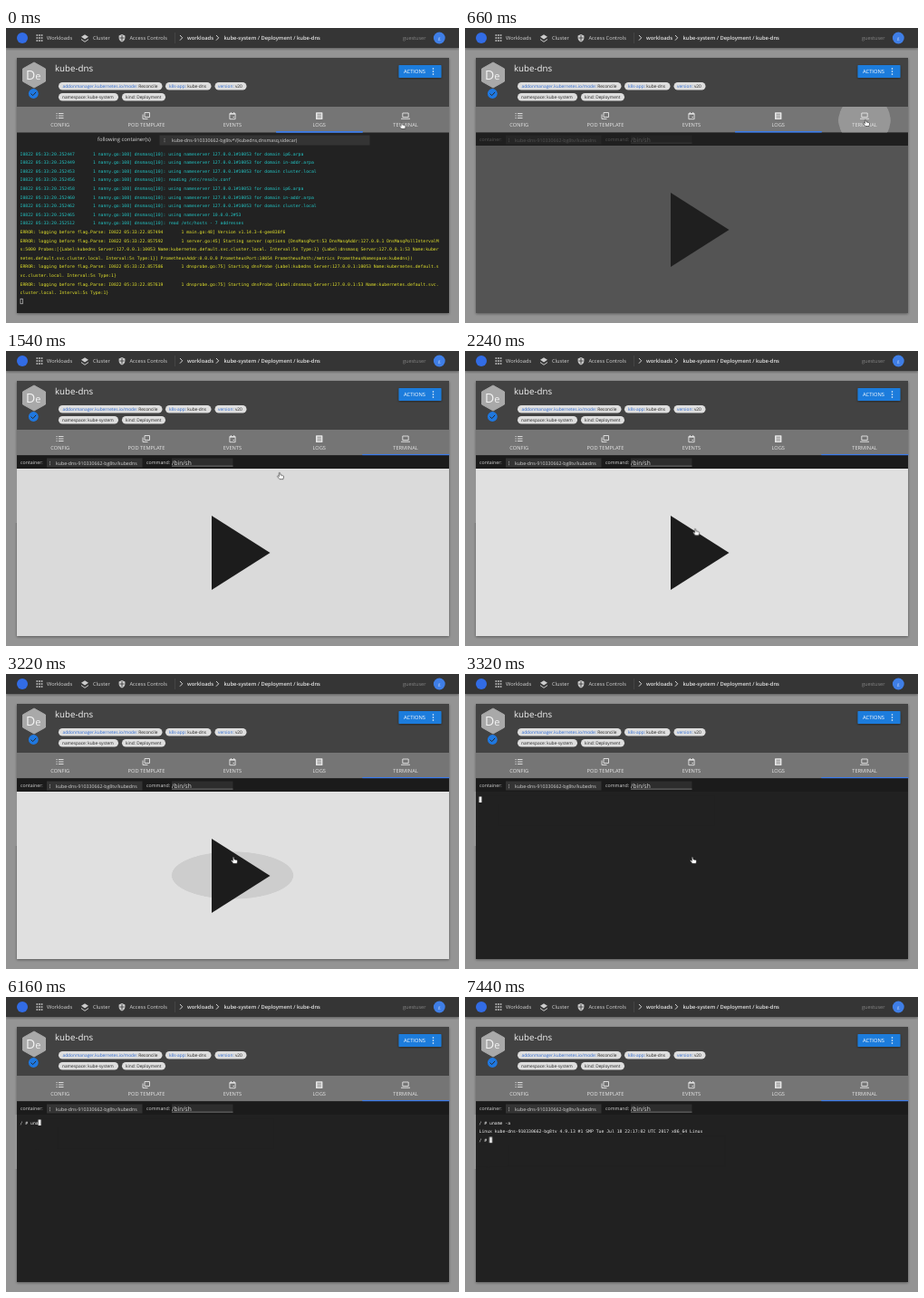
These frames come from a looping animation (500x326 px, 8000 ms). An HTML page:

```html
<!DOCTYPE html>
<html lang="en">
<head>
<meta charset="utf-8">
<title>Cluster console</title>
<style>
  html, body { margin: 0; width: 100%; height: 100%; overflow: hidden; background: #949494; }
  svg { display: block; width: 100%; height: 100%; }
  text { font-family: "Open Sans", "Noto Sans", sans-serif; white-space: pre; text-rendering: geometricPrecision; }
  .nav { font-size: 5.7px; fill: #d2d2d2; }
  .path { font-size: 5.8px; font-weight: 600; fill: #e4e4e4; }
  .tab { font-size: 5.7px; fill: #e6e6e6; text-anchor: middle; }
  .chip { font-size: 4.8px; fill: #222; }
  .chip .key { fill: #2f6ad0; }
  .field { font-size: 5.25px; fill: #d4d4d4; }
  .mono { font-family: "DejaVu Sans Mono", monospace; font-size: 4.78px; fill: #f0f0f0; }
  .line { fill: none; stroke: #e6e6e6; stroke-width: .9; }

  .anim { animation: 8s linear infinite; }
  .step { animation: 8s step-end infinite; }

  #logs { animation-name: logs; }
  @keyframes logs { 0% { opacity: 1 } 7.5%, 100% { opacity: 0 } }
  #terminal { animation-name: terminal; }
  @keyframes terminal { 0%, 7.5% { opacity: 0 } 10.25%, 100% { opacity: 1 } }
  #start { animation-name: start; }
  @keyframes start { 0% { opacity: 1 } 41.25%, 100% { opacity: 0 } }
  #panel { animation-name: panel; }
  @keyframes panel { 0%, 18.5% { fill: #d9d9d9 } 24%, 100% { fill: #e0e0e0 } }

  #tabRipple { animation-name: tabRipple; transform-origin: 441px 102px; }
  @keyframes tabRipple {
    0%, 4.5% { transform: scale(0); opacity: .25 }
    9.25% { transform: scale(1); opacity: .25 }
    11% { transform: scale(1.25); opacity: .2 }
    14%, 100% { transform: scale(1.4); opacity: 0 }
  }
  #playRipple { animation-name: playRipple; transform-origin: 250px 222.5px; }
  @keyframes playRipple { 0%, 39.5% { transform: scale(0) } 40.25% { transform: scale(1) } 41.25%, 100% { transform: scale(2.33) } }

  #inkLead { animation-name: inkLead; }
  #inkTrail { animation-name: inkTrail; }
  @keyframes inkLead {
    0%, 8.75% { transform: none; animation-timing-function: cubic-bezier(.35, 0, .25, 1) }
    11.875%, 100% { transform: translateX(95.4px) }
  }
  @keyframes inkTrail {
    0%, 8.75% { transform: none; animation-timing-function: cubic-bezier(.35, 0, .25, 1) }
    15%, 100% { transform: translateX(95.4px) }
  }

  #pointer { animation-name: pointer, pointerShown; animation-timing-function: linear, step-end; }
  @keyframes pointer {
    0%, .25% { transform: translate(437.5px, 108px); animation-timing-function: ease-out }
    4% { transform: translate(443px, 105px) }
    10.25% { transform: translate(443px, 105px); animation-timing-function: cubic-bezier(.4, 0, .7, .9) }
    19.25% { transform: translate(303px, 138px); animation-timing-function: ease-out }
    30.5%, 31.5% { transform: translate(251.3px, 205.3px) }
    35.75%, 100% { transform: translate(252px, 206px) }
  }
  @keyframes pointerShown { 0% { opacity: 1 } 72%, 100% { opacity: 0 } }

  /* The caret carries a cover that hides everything not yet typed. */
  #caret { --cw: 2.878px; animation-name: caret; }
  @keyframes caret {
    0% { transform: none }
    42% { transform: translateX(calc(4 * var(--cw))) }
    72.25% { transform: translateX(calc(5 * var(--cw))) }
    74.5% { transform: translateX(calc(6 * var(--cw))) }
    77% { transform: translateX(calc(7 * var(--cw))) }
    78.25% { transform: translateX(calc(8 * var(--cw))) }
    80% { transform: translateX(calc(9 * var(--cw))) }
    86.5% { transform: translateX(calc(10 * var(--cw))) }
    88.5% { transform: translateX(calc(11 * var(--cw))) }
    90.25% { transform: translateX(calc(12 * var(--cw))) }
    92.75% { transform: translateY(9.6px) }
    93%, 100% { transform: translate(calc(4 * var(--cw)), 19.2px) }
  }
  #block { animation-name: blink; }
  @keyframes blink { 0% { opacity: 1 } 50.5% { opacity: 0 } 59.25% { opacity: 1 } 68% { opacity: 0 } 72%, 100% { opacity: 1 } }
</style>
</head>
<body>
<svg viewBox="0 0 500 326" preserveAspectRatio="none">
  <defs>
    <clipPath id="tabsClip"><rect x="12" y="87" width="477" height="28.5"/></clipPath>
    <clipPath id="panelClip"><rect x="12" y="130" width="477" height="185"/></clipPath>
    <filter id="shadow" x="-5%" y="-5%" width="110%" height="115%"><feDropShadow dx="0" dy="1" stdDeviation="1.5" flood-opacity=".4"/></filter>
    <g id="dots"><circle cy="-3" r=".8"/><circle r=".8"/><circle cy="3" r=".8"/></g>
  </defs>
  <rect width="500" height="326" fill="#949494"/>

  <g id="topbar">
    <rect y="-4" width="500" height="26" fill="#343434" filter="url(#shadow)"/>
    <circle cx="18" cy="11" r="6" fill="#326ce5"/>
    <path d="M33.5 8h7M33.5 11h7M33.5 14h7" stroke="#ccc" stroke-width="1.7" stroke-dasharray="1.7 .9"/>
    <text class="nav" x="45" y="13">Workloads</text>
    <path d="M87 7.2l4 2.6-4 2.6-4-2.6zM83 12l4 2.7 4-2.7v1.1l-4 2.6-4-2.6z" fill="#ccc"/>
    <text class="nav" x="96" y="13">Cluster</text>
    <path d="M128 7l3.4 1.4v2.6c0 2.2-1.6 3.8-3.4 4.5-1.8-.7-3.4-2.3-3.4-4.5V8.400z" fill="#ccc"/>
    <path d="M128 8v6.400M125.500 11h5" stroke="#343434" stroke-width=".8"/>
    <text class="nav" x="136.500" y="13">Access Controls</text>
    <path class="line" d="M192 8l2.700 2.800-2.700 2.800M232 8l2.700 2.800-2.700 2.800"/>
    <path d="M186.500 5v12" stroke="#555" stroke-width=".5"/>
    <text class="path" x="200" y="12.500">workloads</text>
    <text class="path" x="240.500" y="12.500">kube-system / Deployment / kube-dns</text>
    <text x="438" y="13" font-size="5.5" fill="#858585">guestuser</text>
    <circle cx="478.300" cy="11" r="6.400" fill="#3f7ee6"/>
    <text x="478.300" y="12.500" font-size="4.500" fill="#c8dcfa" text-anchor="middle">g</text>
  </g>

  <rect x="12" y="33" width="477" height="282" fill="#212121" filter="url(#shadow)"/>

  <g id="header">
    <rect x="12" y="33" width="477" height="54" fill="#424242"/>
    <path d="M31 38l12.500 7v14L31 66l-12.500-7V45z" fill="#a9a9a9" stroke="#a9a9a9" stroke-linejoin="round"/>
    <text x="22" y="57" font-size="14" fill="#f4f4f4">D<tspan font-size="11">e</tspan></text>
    <circle cx="30.300" cy="72.500" r="5.400" fill="#1f78e0"/>
    <path d="M27.600 72.600l2 2 3.600-3.800" fill="none" stroke="#2a2a2a" stroke-width="1"/>
    <text x="54" y="47.500" font-size="9.700" fill="#f4f4f4">kube-dns</text>
    <g fill="#dedede">
      <rect x="58" y="60" width="114.500" height="8.500" rx="4.250"/>
      <rect x="176" y="60" width="50.500" height="8.500" rx="4.250"/>
      <rect x="230.500" y="60" width="35" height="8.500" rx="4.250"/>
      <rect x="58" y="72" width="66" height="8.500" rx="4.250"/>
      <rect x="128" y="72" width="48" height="8.500" rx="4.250"/>
    </g>
    <text class="chip" x="62.500" y="66"><tspan class="key">addonmanager.kubernetes.io/mode:</tspan> Reconcile</text>
    <text class="chip" x="180" y="66"><tspan class="key">k8s-app:</tspan> kube-dns</text>
    <text class="chip" x="234" y="66"><tspan class="key">version:</tspan> v20</text>
    <text class="chip" x="62" y="78">namespace: kube-system</text>
    <text class="chip" x="132" y="78">kind: Deployment</text>
    <rect x="433.500" y="41" width="47" height="14" rx=".8" fill="#1c7cdc" filter="url(#shadow)"/>
    <text x="439" y="50" font-size="5.750" fill="#fff">ACTIONS</text>
    <use href="#dots" x="471.500" y="48" fill="#fff"/>
  </g>

  <g id="tabs">
    <rect x="12" y="87" width="477" height="28.500" fill="#757575"/>
    <g clip-path="url(#tabsClip)"><circle id="tabRipple" class="anim" cx="441" cy="102" r="36" fill="#fff"/></g>
    <path class="line" d="M55.500 94.500h1.200M58 94.500h5.500M55.500 97h1.200M58 97h5.500M55.500 99.500h1.200M58 99.500h5.500" stroke-width="1.200"/>
    <path class="line" d="M153 93.500h5.500v5H153zM151 95.500v5h5.500"/>
    <path class="line" d="M246.900 94.500h6.200v6.200h-6.200zM246.900 95.200h6.200M248.300 93v1.500M251.700 93v1.500M250.500 98.500h1.500" stroke-width="1.100"/>
    <rect x="342" y="93.200" width="7.400" height="7.800" rx=".6" fill="#e6e6e6"/>
    <path d="M343.500 95.200h4.400M343.500 97.100h4.400M343.500 99h4.400" stroke="#757575" stroke-width=".8"/>
    <path class="line" d="M437.800 94h6.400v4.600h-6.400zM436 100.300h10" stroke-width="1.100"/>
    <text class="tab" x="59.700" y="109.300">CONFIG</text>
    <text class="tab" x="155" y="109.300">POD TEMPLATE</text>
    <text class="tab" x="250" y="109.300">EVENTS</text>
    <text class="tab" x="345.700" y="109.300">LOGS</text>
    <text class="tab" x="441" y="109.300">TERMINAL</text>
    <g fill="#3b7cec">
      <rect id="inkLead" class="anim" x="298.200" y="114" width="95.400" height="1.500"/>
      <rect id="inkTrail" class="anim" x="298.200" y="114" width="95.400" height="1.500"/>
    </g>
  </g>

  <g id="logs" class="step">
    <text class="field" x="101" y="125" style="font-size:5.900px">following container(s)</text>
    <rect x="169.500" y="118.500" width="232" height="11" fill="#343434"/>
    <use href="#dots" x="175" y="124" fill="#bbb" transform="translate(70 49.600) scale(.6)"/>
    <text class="field" x="183" y="126">kube-dns-910330662-bg8tv*/(kubedns,dnsmasq,sidecar)</text>
    <g id="logLines"></g>
    <rect x="16" y="299.200" width="2.400" height="5.600" fill="none" stroke="#ddd" stroke-width=".6"/>
  </g>

  <g id="terminal" class="anim">
    <rect x="12" y="115.500" width="477" height="199.500" fill="#212121"/>
    <rect x="12" y="115.500" width="477" height="14.500" fill="#1b1b1b"/>
    <text class="field" x="16" y="124.800">container:</text>
    <rect x="45" y="118.500" width="105.500" height="10" fill="#343434"/>
    <use href="#dots" fill="#ddd" transform="translate(48.500 124) scale(.6)"/>
    <text class="field" x="55" y="125.700">kube-dns-910330662-bg8tv/kubedns</text>
    <text class="field" x="155" y="124.800">command:</text>
    <rect x="183" y="118.500" width="67.500" height="8.500" fill="#2d2d2d"/>
    <path d="M183 127.200h67.500" stroke="#aaa" stroke-width=".6"/>
    <text x="183" y="125.600" font-size="6.600" fill="#e0e0e0">/bin/sh</text>

    <text class="mono" x="15.600" y="140.600">/ # uname -a</text>
    <text class="mono" x="15.600" y="150.200">Linux kube-dns-910330662-bg8tv 4.9.13 #1 SMP Tue Jul 18 22:17:02 UTC 2017 x86_64 Linux</text>
    <text class="mono" x="15.600" y="159.800">/ #</text>
    <g id="caret" class="step">
      <path d="M15.500 134.500h260v33h-262v-23.500h2z M12.500 144.100h3v25h-3z" fill="#212121"/>
      <path d="M12.500 144.100h60v24h-60z" fill="#212121" transform="translate(-36 0)" clip-path="none"/>
      <rect id="block" class="step" x="15.500" y="135.500" width="2.900" height="6.500" fill="#f4f4f4"/>
    </g>
    <rect x="-40" y="130" width="52" height="60" fill="#949494"/>

    <g id="start" class="step" clip-path="url(#panelClip)">
      <rect id="panel" class="anim" x="12" y="130" width="477" height="185" fill="#d9d9d9"/>
      <ellipse id="playRipple" class="anim" cx="250" cy="222.500" rx="66" ry="25.700" fill="#cdcdcd"/>
      <path d="M227 182l64.500 41-64.500 41z" fill="#1c1c1c"/>
    </g>
  </g>

  <g id="pointer" class="anim">
    <path d="M-1.700-3.500c.7-.6 1.300-.1 1.400.5l.3 1.900 2.600.6c.8.2 1 .7.9 1.400L3 3.500h-4L-3.300.7c-.4-.8.400-1.200 1-.7l.8.600z" fill="#fff" stroke="#222" stroke-width=".6"/>
  </g>
</svg>
<script>
  const COLUMNS = 161, LINE = 9.6;
  const dns = (time, message) =>
    `I0822 05:33:20.${time}       1 nanny.go:108] dnsmasq[10]: ${message}`;
  const local = domain => `using nameserver 127.0.0.1#10053 for domain ${domain}`;
  const error = (time, message) =>
    `ERROR: logging before flag.Parse: I0822 05:33:22.${time}       1 ${message}`;
  const probe = (label, port) =>
    `{Label:${label} Server:127.0.0.1:${port} Name:kubernetes.default.svc.cluster.local. Interval:5s Type:1}`;

  const entries = [
    dns(252447, local("ip6.arpa")),
    dns(252449, local("in-addr.arpa")),
    dns(252453, local("cluster.local")),
    dns(252456, "reading /etc/resolv.conf"),
    dns(252458, local("ip6.arpa")),
    dns(252460, local("in-addr.arpa")),
    dns(252462, local("cluster.local")),
    dns(252465, "using nameserver 10.0.0.2#53"),
    dns(252512, "read /etc/hosts - 7 addresses"),
    error(857494, "main.go:48] Version v1.14.3-4-gee838f6"),
    error(857592, "server.go:45] Starting server (options {DnsMasqPort:53 DnsMasqAddr:127.0.0.1 " +
      `DnsMasqPollIntervalMs:5000 Probes:[${probe("kubedns", 10053)} ${probe("dnsmasq", 53)}] ` +
      "PrometheusAddr:0.0.0.0 PrometheusPort:10054 PrometheusPath:/metrics PrometheusNamespace:kubedns})"),
    error(857586, `dnsprobe.go:75] Starting dnsProbe ${probe("kubedns", 10053)}`),
    error(857619, `dnsprobe.go:75] Starting dnsProbe ${probe("dnsmasq", 53)}`)
  ];

  const logLines = document.getElementById("logLines");
  let row = 0;
  for (const entry of entries) {
    const color = entry.startsWith("ERROR") ? "#e2e22c" : "#22c4c4";
    for (const part of entry.match(new RegExp(`.{1,${COLUMNS}}`, "g"))) {
      const text = document.createElementNS("http://www.w3.org/2000/svg", "text");
      text.setAttribute("class", "mono");
      text.setAttribute("x", 15.6);
      text.setAttribute("y", 140.6 + LINE * row++);
      text.style.fill = color;
      text.textContent = part;
      logLines.append(text);
    }
  }
</script>
</body>
</html>
```
